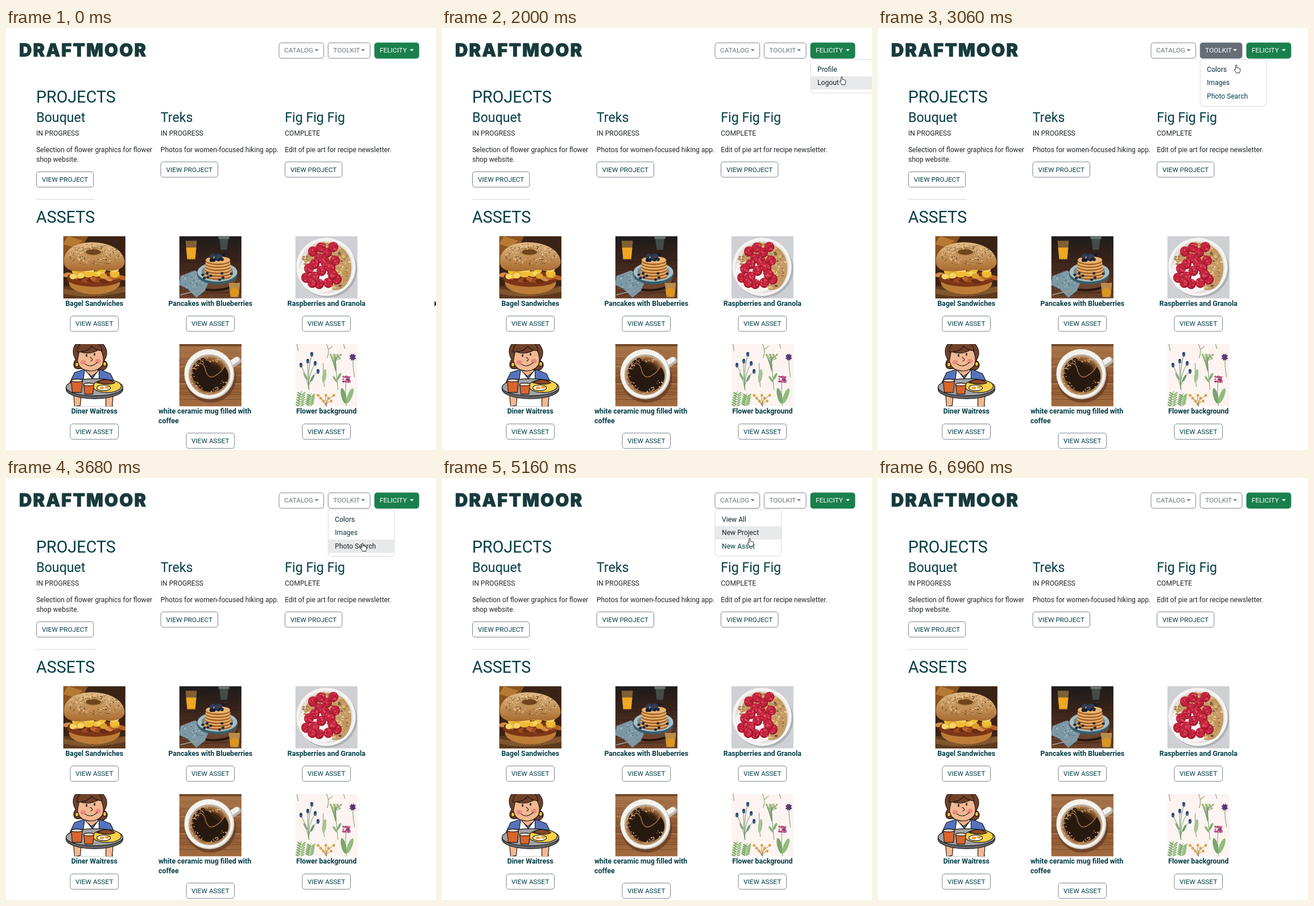
Animation of 756x741 px, one loop 6980 ms. Source, as an HTML page:

```html
<!DOCTYPE html>
<html lang="en">
<head>
<meta charset="utf-8">
<title>Projects and assets</title>
<style>
  html, body { margin: 0; width: 100%; height: 100%; overflow: hidden; background: #fff; }
  svg { display: block; width: 756px; height: 741px; }
  text { font: 12.1px Roboto, "Open Sans", sans-serif; fill: #212529; white-space: pre; }
  .brand { font: 900 31px Inter, "DejaVu Sans", sans-serif; letter-spacing: 2.2px; fill: #183a3c; stroke: #183a3c; stroke-width: .8; }
  .h1 { font-size: 28.7px; fill: #053d46; }
  .h2 { font-size: 23.2px; fill: #053d46; }
  .label { font-size: 11.8px; fill: #053d46; }
  .caption { font-size: 12.4px; font-weight: 700; fill: #053d46; }
  .mid { text-anchor: middle; }
  .box { fill: #fff; stroke: #6c757d; stroke-width: .9; }
  .nav text { font-size: 11.8px; fill: #6c757d; }
  .nav path { fill: #6c757d; }
  .nav.hot .box { fill: #666d75; }
  .nav.hot text, .nav.user text { fill: #fff; }
  .nav.hot path, .nav.user path { fill: #fff; }
  .nav.user .box { fill: #1a804d; stroke: #1a804d; }
  .nav.user.hot .box { fill: #146a40; stroke: #146a40; }
  .panel { fill: #fff; stroke: #d2d4d6; stroke-width: .9; }
  .item rect { fill: none; }
  .item text { fill: #053d46; }
  .item.first text { fill: #04272d; }
  .item.hot rect { fill: #e8e9eb; }
  .item.hot text { fill: #1e2125; }
</style>
</head>
<body>
<svg id="stage" viewBox="0 0 756 741">
  <defs><clipPath id="crop"><rect width="109.3" height="109.3"/></clipPath>
    <linearGradient id="wood" x2="0" y2="1"><stop stop-color="#a9754a"/><stop offset=".5" stop-color="#8c5831"/><stop offset="1" stop-color="#a26b40"/></linearGradient>
    <linearGradient id="night" x2="0" y2="1"><stop stop-color="#1d1b1b"/><stop offset=".4" stop-color="#3a241b"/><stop offset="1" stop-color="#6a4029"/></linearGradient>
    <linearGradient id="crust" x2="0" y2="1"><stop stop-color="#dfb983"/><stop offset="1" stop-color="#a86a2f"/></linearGradient>
    <radialGradient id="brew"><stop stop-color="#24160f"/><stop offset=".62" stop-color="#38220f"/><stop offset=".85" stop-color="#8b5a30"/><stop offset="1" stop-color="#c39561"/></radialGradient>
  </defs>
  <text class="brand" x="23" y="50">DRAFTMOOR</text>
  <g id="page"></g>
  <g id="navs"></g>
  <g id="menus"></g>
  <g id="cursor" fill="#fff" stroke="#111" stroke-width=".9" stroke-linejoin="round">
    <path id="arrow" fill="#111" stroke="#fff" d="M0 0V11L2.6 8.6 4.2 12.3 6 11.5 4.4 7.9H8z"/>
    <path id="hand" d="M-1.3 7.5V.8a1.1 1.1 0 0 1 2.3 0V4.6q1.6-.6 2 .4 1.6-.5 2 .5 1.8-.2 1.8 1.3v2.6q0 1.4-1 3v1.2H-.2q-.4-1.4-2-3.2L-3.8 7.8q.6-1.4 2.5-.3z"/>
  </g>
</svg>
<script>
const LOOP = 6980, LAG = 80;
const $ = id => document.getElementById(id);

let seed = 7;
const rnd = (a = 0, b = 1) => {
  seed = (seed * 16807) % 2147483647;
  return a + (b - a) * seed / 2147483647;
};
const many = (n, f) => Array.from({ length: n }, (_, i) => f(i)).join('');
const pick = list => list[Math.floor(rnd(0, list.length))];

const text = (x, y, s, cls = '') => `<text x="${x}" y="${y}" class="${cls}">${s}</text>`;
const oval = (x, y, rx, ry, fill, more = '') =>
  `<ellipse cx="${x}" cy="${y}" rx="${rx}" ry="${ry}" fill="${fill}" ${more}/>`;
const rect = (x, y, w, h, fill, more = '') =>
  `<rect x="${x}" y="${y}" width="${w}" height="${h}" fill="${fill}" ${more}/>`;
const path = (d, fill, more = '') => `<path d="${d}" fill="${fill}" ${more}/>`;
const line = (d, stroke, w = 1) => path(d, 'none', `stroke="${stroke}" stroke-width="${w}" stroke-linecap="round"`);
const button = (x, y, w, s) =>
  `<rect class="box" x="${x}" y="${y}" width="${w}" height="27" rx="4.4"/>` + text(x + w / 2, y + 17.6, s, 'label mid');

// Pictures, each on a 109 px square
function bagel() {
  return rect(0, 0, 110, 110, '#3a2314') +
    path('M0 0H44L30 26 0 40z', '#8b531f') + path('M8 0L34 8 20 20 0 14z', '#b67a34') +
    rect(0, 88, 110, 22, '#5c391e') + path('M0 92Q55 104 110 88V98Q50 112 0 101z', '#80552d') +
    oval(55, 82, 45, 20, '#bd7d37') + oval(55, 75, 48, 14, '#7d3517') +
    many(13, i => oval(8 + i * 8, 73 + rnd(-5, 7), 8, 4, pick(['#9b4a1d', '#b9622c', '#6b2b14', '#d48b48']), `transform="rotate(${rnd(-20, 20)} ${8 + i * 8} 73)"`)) +
    many(24, () => oval(rnd(10, 98), rnd(55, 71), rnd(5, 9), 5, pick(['#efbd35', '#f7d566', '#dba02a']))) +
    path('M1 44C2 20 27 10 55 11s52 14 53 34c0 13-17 17-32 15-18-4-43 6-63 0C4 56 1 52 1 44z', 'url(#crust)') +
    oval(53, 27, 18, 8, '#b9894f') + oval(53, 28, 13, 5, '#704519') +
    many(170, () => {
      const a = rnd(0, 6.28), r = rnd(.42, .95);
      return oval(54 + Math.cos(a) * 50 * r, 33 + Math.sin(a) * 20 * r, 1.1, .7, pick(['#f5e4bd', '#ead09c', '#4d321c', '#8c6437']));
    });
}

function pancakes() {
  return rect(0, 0, 110, 110, 'url(#night)') +
    many(5, i => line(`M0 ${46 + i * 14}L110 ${42 + i * 14}`, '#321e17', .8)) +
    path('M70 0H87L84 24H73z', '#444c48') + rect(69, 0, 19, 5, '#69716c') +
    path('M11 8H31L28 41H14z', '#c9974a', 'opacity=".55"') + path('M12 20H30L28 40H14z', '#efa820') +
    oval(60, 79, 41, 18, '#25160f') + oval(60, 75, 41, 18, '#6e452e') +
    path('M2 70L28 60 52 80 45 96 30 108 14 92 0 86z', '#7d98a5') +
    many(32, () => oval(rnd(7, 40), rnd(68, 94), 1.3, .8, pick(['#b8cbd1', '#526f80']))) +
    oval(67, 66, 36, 19, '#395d69') + oval(67, 63, 35, 17, '#a7bec3') + oval(67, 62, 28, 12, '#738d95') +
    many(6, i => oval(68, 70 - i * 5.2, 24 - i * .5, 7, '#a65d24') + oval(68, 68 - i * 5.2, 24 - i * .5, 6.4, '#e6b36d')) +
    many(18, () => oval(rnd(56, 80), rnd(32, 43), 3, 2.8, pick(['#20283f', '#303c58', '#151b2c']))) +
    many(9, () => oval(rnd(38, 95), rnd(65, 77), 2.6, 2.3, '#202b41')) +
    line('M2 103L34 96', '#9d9b94', 1.6) +
    path('M87 82H107L104 107H90z', '#ba8c4b') + oval(97, 99, 8, 8, '#dc961e');
}

function berries() {
  const spots = [[31, 27], [45, 20], [56, 29], [67, 19], [42, 39], [34, 49], [53, 46], [24, 57], [19, 73], [34, 71], [46, 61], [62, 56], [73, 76], [58, 82], [42, 84], [66, 68], [30, 82], [70, 43]];
  return rect(0, 0, 110, 110, '#ced0d3') + oval(57, 58, 52, 50, '#aeb1b5') + oval(54, 54, 52, 51, '#f4f4f2') +
    oval(54, 54, 47, 46, '#e4dfd9') + oval(45, 64, 38, 35, '#f7f3f1') +
    path('M60 12C88 15 102 38 98 64S77 98 65 94L61 56 38 40 17 47C18 25 35 10 60 12z', '#c39c68') +
    many(150, () => {
      const a = rnd(-1.7, 1.3), r = rnd(10, 43);
      return oval(54 + Math.cos(a) * r, 54 + Math.sin(a) * r, rnd(1.3, 3), rnd(1, 2), pick(['#e0bd82', '#a97943', '#efd8a8', '#74503a', '#c8924d']));
    }) +
    many(22, () => oval(rnd(13, 34), rnd(32, 52), 2.5, 1.6, pick(['#d9b174', '#a87949']))) +
    spots.map(([x, y]) => oval(x, y, 8.5, 9, '#9d1329') + oval(x - .6, y - .8, 7.5, 7.8, '#c72540') +
      many(10, () => oval(x + rnd(-6, 6), y + rnd(-6, 6), 1.4, 1.4, pick(['#df5163', '#a81932'])))).join('');
}

function waitress() {
  const ink = 'stroke="#171313" stroke-width="1.1" stroke-linejoin="round"';
  const cup = (x, y, w, h) => path(`M${x} ${y}h${w}l-2 ${h}h${4 - w}z`, '#d9652a', ink) + oval(x + w / 2, y, w / 2, 2.5, '#f4dccb', ink);
  return rect(0, 0, 110, 110, '#fff') +
    path('M22 0H70Q82 14 72 29C82 34 77 46 68 46L30 43C17 46 16 35 22 27Q13 12 22 0z', '#70412a', ink) +
    path('M35 45L20 50 11 69 25 86H83L93 73 83 52 66 45z', '#5573bc', ink) +
    path('M38 44L51 61 63 44V84H32z', '#fff', ink) + path('M40 40V48L50 57 61 48V39z', '#eeb18b', ink) +
    path('M28 13Q48 21 65 8Q74 24 69 37 60 49 45 47 27 45 25 29z', '#f2b891', ink) +
    path('M24 14Q25-5 46-3 68-4 68 12 56 11 50 4 42 15 24 14z', '#70412a', ink) +
    oval(35, 32, 5, 4, '#ec8a7c') + oval(61, 30, 5, 4, '#ec8a7c') +
    oval(41, 20, 1.4, 2.5, '#171313') + oval(55, 18, 1.4, 2.5, '#171313') +
    path('M47 23q8 5 1 7', 'none', ink) + path('M38 35Q49 43 60 32', 'none', ink) +
    oval(24, 36, 3, 4, '#ecc22e', ink) + oval(73, 35, 3, 4, '#ecc22e', ink) +
    path('M30 81H80L87 110H25z', '#fff', ink) + path('M18 85L32 86 30 108 20 110z', '#f2b891', ink) +
    path('M75 88L88 85 86 110H75z', '#f2b891', ink) +
    oval(55, 79, 50, 17, '#65666a', ink) + oval(55, 76, 50, 15, '#a2a3a6', ink) +
    oval(77, 74, 25, 11, '#f8d247', ink) + path('M59 68Q75 57 91 68 83 73 59 68z', '#8c4829', ink) +
    oval(71, 77, 12, 5, '#fff', ink) + oval(68, 77, 4, 2.6, '#f2a32d') + oval(77, 76, 3.5, 2.4, '#f2a32d') +
    cup(14, 64, 20, 21) + cup(36, 71, 18, 17);
}

function coffee() {
  return rect(0, 0, 110, 110, 'url(#wood)') +
    many(34, () => { const y = rnd(0, 110); return line(`M0 ${y}Q55 ${y + rnd(-3, 3)} 110 ${y}`, pick(['#764724', '#b28056', '#825331']), rnd(.4, 1.4)); }) +
    rect(0, 0, 110, 4, '#734928') + oval(55, 60, 45, 43, '#613a20', 'opacity=".7"') +
    line('M89 38L103 29', '#b9b4ae', 12) + line('M88 35L101 27', '#f3f0eb', 9) +
    oval(53, 53, 44, 44, '#c9c5bf') + oval(52, 52, 43, 43, '#f6f3ee') + oval(53, 54, 37, 36, '#b8ada0') +
    oval(53, 55, 35, 34, 'url(#brew)') +
    path('M42 24C25 30 18 47 25 62c7 18 24 26 42 20 19-7 26-27 13-42-6 10-17 7-21 1-8-10-10-12-17-17z', '#271910') +
    line('M26 42Q41 25 46 45T66 54Q76 48 80 37', '#a87444', 1.5) +
    many(85, () => { const a = rnd(.4, 5.5), r = rnd(24, 34); return oval(53 + Math.cos(a) * r, 55 + Math.sin(a) * r, rnd(.5, 1.6), 1, pick(['#d2aa76', '#9c6739', '#e1c08e'])); });
}

function meadow() {
  const stem = (x, y, x2, y2, c = '#6f9b65') => line(`M${x} ${y}Q${x - 3} ${(y + y2) / 2} ${x2} ${y2}`, c, 1);
  const leaf = (x, y, a, c, s = 1) => oval(x, y, 2.1 * s, 7 * s, c, `transform="rotate(${a} ${x} ${y})"`);
  const fern = (x, y, h) => stem(x, y, x + 4, y - h) + many(6, i =>
    leaf(x - 3 + i * .7, y - i * h / 6, -55, '#7dac6c', .65) + leaf(x + 5 + i * .5, y - i * h / 6, 55, '#91bc7d', .65));
  const heads = [[10, 37], [22, 30], [29, 18], [35, 34], [40, 48]];
  return rect(0, 0, 110, 110, '#fdf3f1') +
    heads.map(([x, y]) => stem(24, 80, x, y) + oval(x, y, 2.7, 4.2, '#40638c') + oval(x, y - 2, 1.8, 2, '#263f65')).join('') +
    leaf(18, 57, -28, '#8aac81') + leaf(30, 60, 28, '#719b73') +
    stem(51, 75, 49, 34) + leaf(51, 56, 8, '#a4c492', 1.7) +
    stem(75, 80, 70, 18) + many(10, i => stem(71, 48 - i * 2, 62 + i * 2, 20 + i % 3 * 3) + oval(62 + i * 2, 19 + i % 3 * 3, 2, 1.8, '#9eb878')) +
    leaf(70, 62, -35, '#8ebb7e') + leaf(77, 57, 28, '#80ae76') +
    stem(104, 58, 101, 23) + [-65, -25, 20, 60].map(a => leaf(101, 23, a, '#583676', .9)).join('') +
    stem(90, 108, 89, 65) + many(26, () => oval(90 + rnd(-6, 6), 62 + rnd(-5, 5), 1.8, 1.8, pick(['#ad4d7d', '#883766', '#ca739b']))) +
    leaf(85, 91, -14, '#78a76c', 2) + leaf(96, 91, 22, '#91bd7d', 2) +
    fern(7, 108, 25) + fern(24, 106, 19) +
    many(7, i => { const x = 40 + i * 4.6, y = 90 + (i % 3) * 5; return stem(55, 110, x, y, '#a28d55') + oval(x, y, 2.5, 2.5, '#dba948'); }) +
    line('M55 0Q61 12 56 24M58 10L65 4M85 0L87 8M3 0L5 12', '#82a875', 1.2);
}

// Static page
const project = (x, name, state, lines) => {
  const drop = (lines.length - 1) * 17.4;
  return text(x, 165, name, 'h2') + text(x, 188.7, state) +
    lines.map((s, i) => text(x, 218 + i * 17.4, s)).join('') + button(x + .3, 235 + drop, 100.4, 'VIEW PROJECT');
};
const asset = (col, row, art, lines) => {
  const x = 155.3 + col * 204, y = 365.4 + row * 189.5;
  const caption = lines.length > 1
    ? lines.map((s, i) => text(268, y + 122 + i * 17.4, s, 'caption')).join('')
    : text(x, y + 122.4, lines[0], 'caption mid');
  return `<g transform="translate(${x - 54.7} ${y})" clip-path="url(#crop)">${art()}</g>` + caption +
    button(x - 42.3, y + 140.3 + (lines.length - 1) * 16, 84.6, 'VIEW ASSET');
};
$('page').innerHTML =
  text(53, 131, 'PROJECTS', 'h1') +
  project(53.2, 'Bouquet', 'IN PROGRESS', ['Selection of flower graphics for flower', 'shop website.']) +
  project(271.8, 'Treks', 'IN PROGRESS', ['Photos for women-focused hiking app.']) +
  project(490.2, 'Fig Fig Fig', 'COMPLETE', ['Edit of pie art for recipe newsletter.']) +
  rect(53.5, 300.5, 102.5, .9, '#c9cccd') + text(53, 342, 'ASSETS', 'h1') +
  asset(0, 0, bagel, ['Bagel Sandwiches']) +
  asset(1, 0, pancakes, ['Pancakes with Blueberries']) +
  asset(2, 0, berries, ['Raspberries and Granola']) +
  asset(0, 1, waitress, ['Diner Waitress']) +
  asset(1, 1, coffee, ['white ceramic mug filled with', 'coffee']) +
  asset(2, 1, meadow, ['Flower background']);

// Navigation: [left, width, label, items, opens at, closes at, class]
const navs = [
  [480, 78.6, 'CATALOG', ['View All', 'New Project', 'New Asset'], 4800, 5880, ''],
  [566.3, 73.8, 'TOOLKIT', ['Colors', 'Images', 'Photo Search'], 2750, 4150, ''],
  [648, 78, 'FELICITY', ['Profile', 'Logout'], 950, 2750, 'user']
].map(([x, w, label, items, open, close, cls]) => ({ x, w, label, items, open, close, cls }));
const ROW = 23.4, TOP = 61.2;
$('navs').innerHTML = navs.map(n => `<g class="nav ${n.cls}">` +
  `<rect class="box" x="${n.x}" y="26" width="${n.w}" height="27.2" rx="4.4"/>` + text(n.x + 9, 43.2, n.label) +
  `<path d="M${n.x + n.w - 16} 37.2h7l-3.5 3.5z"/></g>`).join('');
$('menus').innerHTML = navs.map(n => '<g>' +
  `<rect class="panel" x="${n.x}" y="55.2" width="116.6" height="${n.items.length * ROW + 12}" rx="4.4"/>` +
  n.items.map((s, i) => `<g class="item ${i ? '' : 'first'}"><rect x="${n.x + .5}" y="${TOP + i * ROW}" width="115.6" height="${ROW}"/>` +
    text(n.x + 12, TOP + i * ROW + 15.6, s) + '</g>').join('') + '</g>').join('');
navs.forEach((n, i) => {
  n.el = $('navs').children[i];
  n.menu = $('menus').children[i];
  n.rows = [...n.menu.querySelectorAll('.item')];
});

// Pointer stops: [ms, x, y]
const stops = [
  [0, 753, 478.5], [100, 752, 474], [800, 711, 37], [1350, 711, 37], [1600, 706, 72], [1700, 706, 72],
  [1900, 703, 86], [2300, 703, 86], [2650, 629, 38], [2930, 629, 38], [3190, 631, 92], [3300, 630, 94],
  [3500, 627, 115], [3700, 627, 115], [4050, 629.5, 37], [4350, 629.5, 37], [4700, 544, 38], [4900, 543, 38],
  [5140, 541, 106.5], [5160, 541, 106.5], [5350, 540, 118], [5500, 540, 118], [5800, 543, 38], [5950, 543, 38],
  [6200, 545, -18], [LOOP, 545, -18]
];
function pointer(t) {
  const i = Math.max(1, stops.findIndex(s => s[0] > t));
  const [t0, x0, y0] = stops[i - 1], [t1, x1, y1] = stops[i];
  const u = Math.max(0, (t - t0) / (t1 - t0)), k = u * u * (3 - 2 * u);
  return [x0 + (x1 - x0) * k, y0 + (y1 - y0) * k];
}
const isOpen = (n, t) => t >= n.open && t < n.close;
const onButton = (n, [x, y]) => x >= n.x && x <= n.x + n.w && y >= 26 && y <= 53.4;
const rowAt = (n, [x, y]) => x >= n.x && x <= n.x + 116.6 ? Math.floor((y - TOP) / ROW) : -1;

function render(t) {
  const now = pointer(t), late = pointer(Math.max(0, t - LAG));
  let link = false;
  for (const n of navs) {
    const open = isOpen(n, t);
    n.el.classList.toggle('hot', onButton(n, late));
    n.menu.style.display = open ? '' : 'none';
    n.rows.forEach((r, i) => r.classList.toggle('hot', open && rowAt(n, late) === i));
    link = link || onButton(n, now) || open && now[1] > 53 && rowAt(n, now) < n.items.length && now[0] >= n.x;
  }
  $('cursor').setAttribute('transform', `translate(${now[0]} ${now[1]})`);
  $('hand').style.display = link ? '' : 'none';
  $('arrow').style.display = link ? 'none' : '';
}
function tick() {
  render(performance.now() % LOOP);
  requestAnimationFrame(tick);
}
tick();
</script>
</body>
</html>
```
